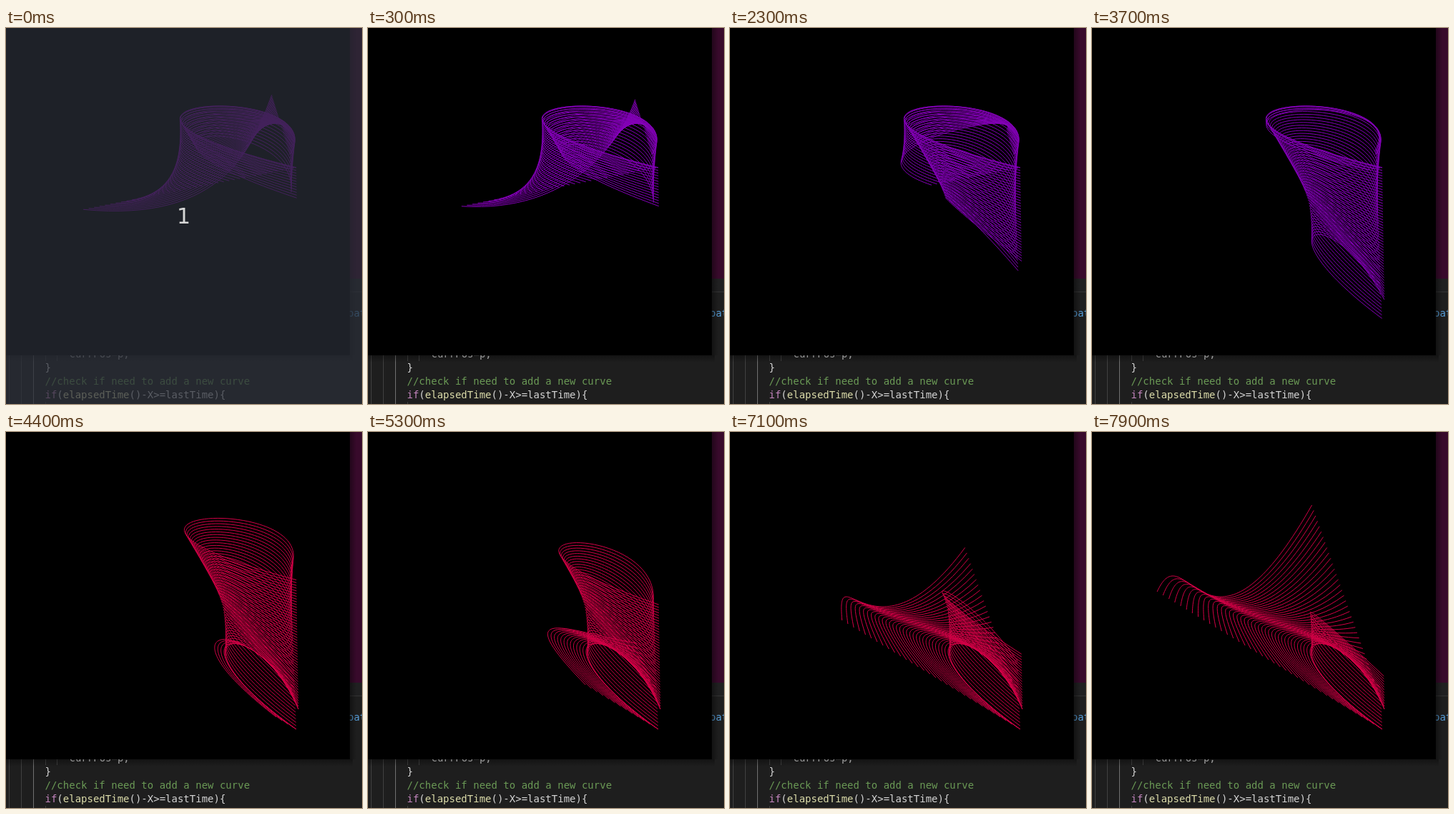
Write an HTML page that moves like this. It is 498 px wide and 525 px high and loops after 8000 ms.

```html
<!DOCTYPE html>
<html lang="en">
<head>
<meta charset="utf-8">
<title>Morphing curves</title>
<style>
  html, body { margin: 0; width: 100%; height: 100%; overflow: hidden; background: #1e1e1e; }
  svg { display: block; width: 498px; height: 525px; }
  .code { font: 14px "DejaVu Sans Mono", monospace; fill: #d4d4d4; white-space: pre; }
  .count { font: 30px "DejaVu Sans", sans-serif; fill: #d6d6d6; text-anchor: middle; }
</style>
</head>
<body>
<svg viewBox="0 0 498 525">
  <defs>
    <linearGradient id="side">
      <stop offset="0" stop-color="#000" stop-opacity=".4"/>
      <stop offset="1" stop-color="#000" stop-opacity="0"/>
    </linearGradient>
    <linearGradient id="below" x2="0" y2="1">
      <stop offset="0" stop-color="#000" stop-opacity=".35"/>
      <stop offset="1" stop-color="#000" stop-opacity="0"/>
    </linearGradient>
  </defs>

  <!-- editor and desktop behind the window -->
  <rect width="498" height="525" fill="#1e1e1e"/>
  <rect x="481" width="17" height="350" fill="#380a2b"/>
  <rect x="481" y="350" width="17" height="18" fill="#202021"/>
  <rect x="481" y="368" width="17" height="1" fill="#343434"/>
  <g fill="#404040">
    <rect x="4" y="457" width="1" height="68"/>
    <rect x="21" y="457" width="1" height="68"/>
    <rect x="38" y="457" width="1" height="68" fill="#707070"/>
    <rect x="55" y="457" width="1" height="8"/>
    <rect x="71" y="457" width="1" height="8"/>
    <rect x="55" y="522" width="1" height="3"/>
  </g>
  <g class="code">
    <text x="88.5" y="460">currPos=p;</text>
    <text x="54.5" y="479">}</text>
    <text x="54.5" y="498" fill="#6a9955">//check if need to add a new curve</text>
    <text x="54.5" y="517"><tspan fill="#c586c0">if</tspan>(<tspan fill="#dcdcaa">elapsedTime</tspan>()-X&gt;=lastTime){</text>
    <text x="478" y="403" fill="#569cd6">path</text>
  </g>
  <rect x="481" width="9" height="457" fill="url(#side)"/>
  <rect y="457" width="485" height="10" fill="url(#below)"/>

  <!-- drawing window -->
  <rect width="481" height="457" fill="#000"/>
  <path id="curves" fill="none" stroke-width="1"/>

  <g id="countdown">
    <rect width="498" height="525" fill="#2a2f38" fill-opacity=".72"/>
    <text class="count" x="248.5" y="273">1</text>
  </g>
</svg>
<script>
const LOOP = 8000, STEP = 100;
const TRAIL = 53;          // curves visible at once
const MORPH = 50;          // steps from one shape to the next
const PERIOD = 51.6;       // morph plus a short rest
const FIRST = -62.6;       // step at which the first morph begins

// Cubic Bezier shapes: x, y of start, two handles, end
const shapes = [
  [365, 71, 313, 190, 385, 319, 28, 269],
  [397, 177, 465, 71, 13, 98, 406, 195],
  [406, 415, 214, 279, 349, 245, 409, 387],
  [-4, 165, 106, 91, 105, 393, 277, 16]
];

const curves = document.getElementById("curves");
const countdown = document.getElementById("countdown");

function curveAt(step) {
  const phase = (step - FIRST) / PERIOD;
  const k = Math.min(Math.floor(phase), shapes.length - 2);
  const mix = Math.min((phase - k) * PERIOD / MORPH, 1);
  const p = shapes[k].map((v, i) => (v + (shapes[k + 1][i] - v) * mix).toFixed(2));
  return `M${p[0]} ${p[1]}C${p.slice(2).join(" ")}`;
}

function render(time) {
  const step = Math.floor(time / STEP);
  let d = "";
  for (let age = TRAIL - 1; age >= 0; age--) d += curveAt(step - age);
  curves.setAttribute("d", d);
  curves.setAttribute("stroke", step < 40 ? "#8400b8" : "#d20046");
  countdown.style.display = step < 1 ? "" : "none";
}

let start;
function tick(now) {
  start ??= now;
  render((now - start) % LOOP);
  requestAnimationFrame(tick);
}
render(0);
requestAnimationFrame(tick);
</script>
</body>
</html>
```
